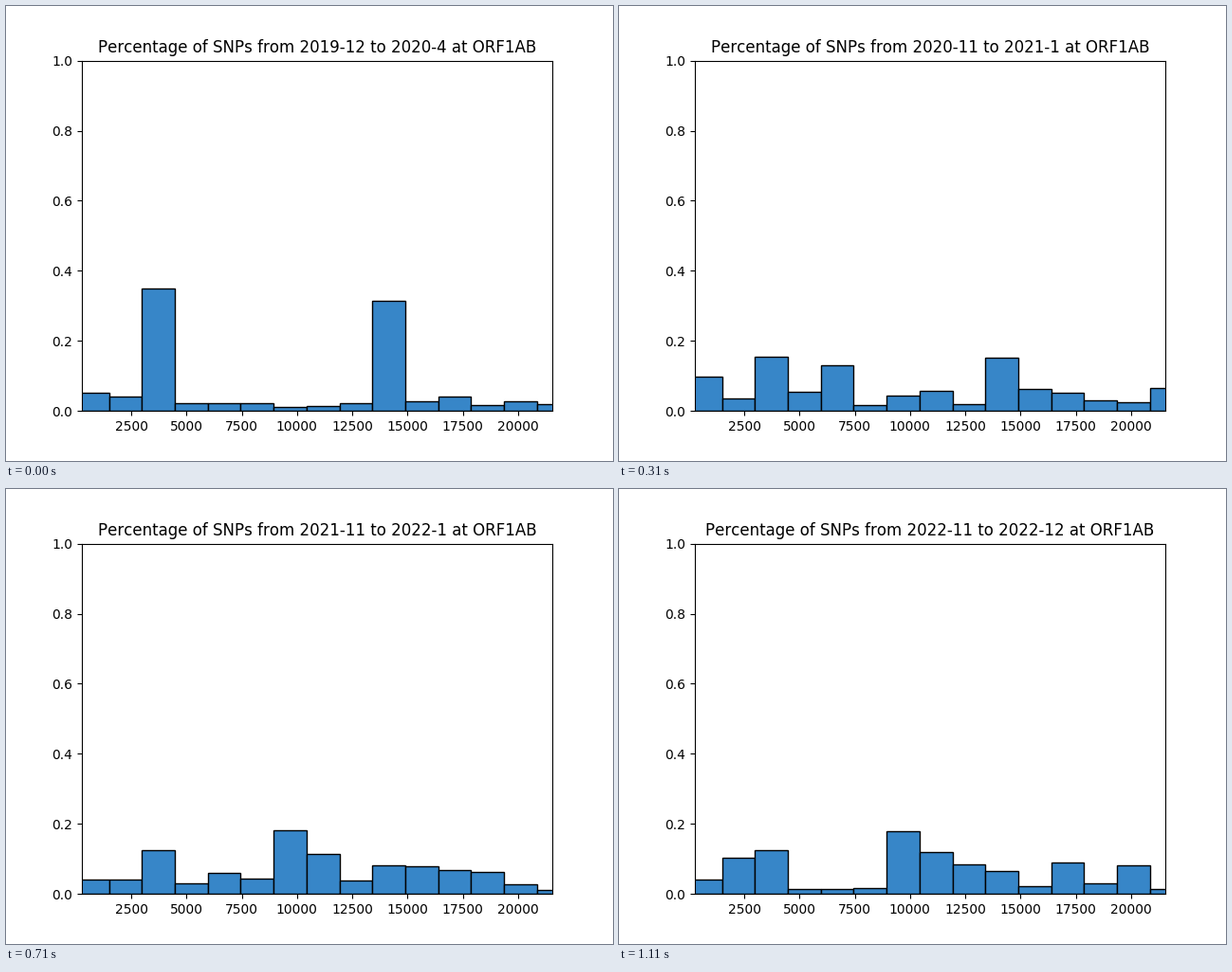
A matplotlib script that plays this animation: 640x480 px, repeating every 1210 ms.

```python
import matplotlib.pyplot as plt
import numpy as np
from matplotlib.animation import FuncAnimation

TICK = 10                # ms per animation frame
LOOP = 1210              # ms per loop
ORF1AB = (266, 21555)    # genome range on show
BIN_START, BIN_WIDTH, BINS = 3, 1490, 15

plt.rcParams["text.kerning_factor"] = 6   # whole-pixel kerning


def bump(q, peak, width):
    return np.exp(-((q - peak) / width) ** 2)


def rise(q, middle, rate=1):
    return 1 / (1 + np.exp(-rate * (q - middle)))


def fade(q, span):
    return np.exp(-q / span)


def shares(q):
    """Share of SNPs per bin in quarter q; what is left over is spread evenly."""
    s = np.array([
        0.038 + 0.145 * bump(q, 2, 1),
        0.030 + 0.080 * rise(q, 9),
        0.120 + 0.220 * fade(q, 1.5),
        0.010 + 0.060 * bump(q, 4.5, 2.3),
        0.010 + 0.325 * bump(q, 2, 0.8) + 0.130 * bump(q, 5, 2),
        0.012 + 0.030 * bump(q, 7, 1),
        0.175 * rise(q, 4, 1.3) + 0.060 * bump(q, 8, 0.7),
        0.115 * rise(q, 3.2),
        0.012 + 0.070 * rise(q, 7.6),
        0.055 + 0.248 * fade(q, 3),
        0.010 + 0.080 * bump(q, 5.5, 3.5),
        0.030 + 0.005 * q,
        0.005 + 0.055 * bump(q, 7, 4),
        0.018 + 0.060 * rise(q, 7.5, 4),
        0.010 + 0.050 * bump(q, 3, 0.6),
    ])
    return np.maximum(s + (1 - s.sum()) / BINS, 0)


def month(n):
    """Label for the n-th month counted from January 2020."""
    return f"{2020 + n // 12}-{n % 12 + 1}"


def period(q):
    first = -1 if q == 0 else 3 * q + 1
    last = min(3 * q + 3, 35)
    return f"{month(first)} to {month(last)}"


fig, ax = plt.subplots(figsize=(6.4, 4.8), dpi=100)
lefts = BIN_START + BIN_WIDTH * np.arange(BINS)
bars = ax.bar(lefts, shares(0), width=BIN_WIDTH, align="edge",
              color="#3786c8", edgecolor="black", linewidth=1)
ax.set_xlim(*ORF1AB)
ax.set_ylim(0, 1)
title = ax.set_title("")


def update(i):
    q = max(i - 1, 0) // 10    # the first quarter holds one tick longer
    for bar, height in zip(bars, shares(q)):
        bar.set_height(height)
    title.set_text(f"Percentage of SNPs from {period(q)} at ORF1AB")
    return [*bars, title]


anim = FuncAnimation(fig, update, frames=LOOP // TICK, interval=TICK,
                     repeat=True, repeat_delay=0, blit=False)
plt.show()
```
